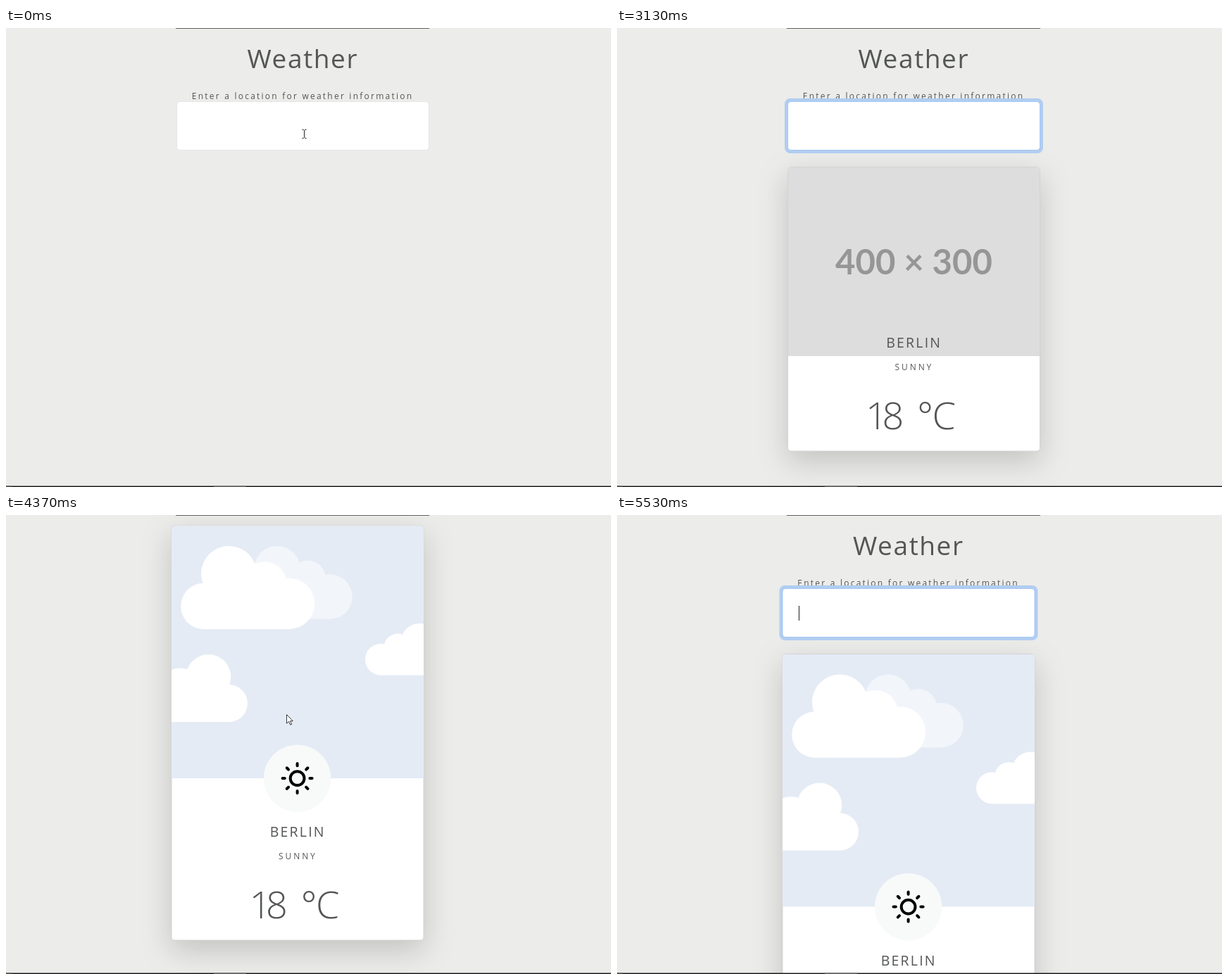
An HTML page for the animation above (5910 ms loop, 859 by 652 pixels).

```html
<!DOCTYPE html>
<html lang="en">
<head>
<meta charset="utf-8">
<title>Weather</title>
<style>
  html, body { margin: 0; width: 100%; height: 100%; overflow: hidden; background: #ececea; }
  svg { display: block; width: 859px; height: 652px; }
  text { font-family: "Open Sans", "Noto Sans", sans-serif; fill: #535655; white-space: pre; }
  .title { font-size: 37px; letter-spacing: 1.6px; }
  .label { font-size: 12px; letter-spacing: 2.23px; }
  .city { font-size: 19.5px; letter-spacing: 2.2px; }
  .sky { font-size: 12px; letter-spacing: 2.9px; }
  .degrees { font-size: 54px; font-weight: 300; }
  .size { font: bold 49px Lato, sans-serif; fill: #969696; text-anchor: middle; }
  #typed { font-size: 14px; fill: #333; }
  .card { fill: #fff; stroke: #d3d3d3; filter: drop-shadow(0 14px 21px rgba(0, 0, 0, .175)); }
</style>
</head>
<body>
<svg viewBox="0 0 859 652">
  <defs>
    <clipPath id="photo"><path d="M235 556.5V202q0-4 4-4h350q4 0 4 4v354.5z"/></clipPath>
    <path id="ray" d="M0 -17.8V-21" stroke="#000" stroke-width="4" stroke-linecap="round"/>
  </defs>

  <g id="page">
    <text class="title" x="342.5" y="56.5">Weather</text>
    <text class="label" x="263.8" y="101">Enter a location for weather information</text>

    <g id="result">
      <rect id="card" class="card" x="242.5" y="197.5" width="358" rx="4"/>
      <g id="placeholder">
        <path d="M243 466V202q0-4 4-4h349q4 0 4 4v264z" fill="#ddd"/>
        <text class="size" x="421.5" y="350">400 × 300</text>
      </g>
      <g id="picture" transform="translate(7.5 0)">
        <g clip-path="url(#photo)" fill="#fff">
          <rect x="235" y="198" width="358" height="358.5" fill="#e4ebf5"/>
          <g fill="#f2f5fa">
            <circle cx="385" cy="259.5" r="33"/><circle cx="428" cy="273" r="26"/>
            <circle cx="460" cy="298.5" r="31.7"/><rect x="380" y="270" width="80" height="60.2"/>
          </g>
          <circle cx="281" cy="312" r="32.8"/><circle cx="316.5" cy="266" r="39.5"/>
          <circle cx="367" cy="281" r="32"/><circle cx="402" cy="308.4" r="36.2"/>
          <rect x="281" y="280" width="121" height="64.7"/>

          <circle cx="532.5" cy="387.7" r="22.5"/><circle cx="556.5" cy="371" r="20"/>
          <circle cx="587" cy="362.5" r="26"/><rect x="532" y="372" width="61" height="38.2"/>

          <circle cx="247" cy="432" r="32"/><circle cx="287.5" cy="412.3" r="31.8"/>
          <circle cx="316.5" cy="450" r="26.5"/><rect x="235" y="425" width="81.5" height="51.5"/>
        </g>
        <g transform="translate(413.6 556.6)">
          <circle r="47.7" fill="#f7faf9"/>
          <circle r="9.9" fill="none" stroke="#000" stroke-width="4"/>
          <g id="rays"></g>
        </g>
      </g>
      <g id="facts">
        <text class="city" x="382.2" y="454">BERLIN</text>
        <text class="sky" x="394.6" y="486.4">SUNNY</text>
        <text class="degrees" x="353 376.5 426 447.5" y="569.5">18°C</text>
      </g>
    </g>

    <rect id="ring" x="238" y="100" width="367" height="78" rx="8" fill="#b1cdf1"/>
    <rect id="field" x="242.5" y="104.5" width="358" height="69" rx="4.5" fill="#fff"/>
    <text id="typed" x="265.5" y="146"></text>
    <rect id="caret" y="129" width="1" height="21" fill="#222"/>
  </g>

  <path id="beam" d="M-3 -6H-1L0 -5L1 -6H3M0 -5V5M-3 6H-1L0 5L1 6H3" fill="none" stroke="#222"/>
  <path id="arrow" d="M0 0V12.5L3 9.8L5.2 14.6L7.2 13.7L5 9.2H8.8Z" fill="#fff" stroke="#222" stroke-width=".9"/>

  <rect x="241" width="360" height="1" fill="#606060"/>
  <rect y="650.5" width="859" height="1.5" fill="#1c1c1c"/>
  <rect x="295" y="650.5" width="46" height="1.5" fill="#6a6a6a"/>
  <rect y="650.5" width="8" height="1.5" fill="#555"/>
</svg>

<script>
  const LOOP = 5910, CARD_AT = 3130, PICTURE_AT = 3230;
  const $ = id => document.getElementById(id);

  // Tracks hold each value until the next time.
  const text = [[0, ""], [1070, "b"], [1270, "be"], [1370, "ber"], [2070, "berl"],
                [2270, "berli"], [2450, "berlin"], [2660, ""]];
  const focus = [[0, 0], [100, .3], [200, .75], [300, 1]];
  const caretOn = [[0, 0], [300, 1], [880, 0], [1070, 1], [1880, 0], [2070, 1],
                   [2950, 0], [3520, 1], [4020, 0], [5530, 1]];
  const scroll = [[0, 0], [4120, 30], [4230, 95.3], [4330, 165], [4370, 182.5],
                  [5070, 150], [5170, 70], [5270, 0]];
  const beam = [[0, [423.5, 150.5]], [600, [416.5, 150.5]], [690, [411.5, 150.5]],
                [880, [410.5, 150.5]], [1070, null], [3620, [408.5, 150.5]], [3720, null]];
  const arrow = [[0, null], [3720, [403, 190]], [3820, [403, 245]], [3920, [402, 276]],
                 [4020, [401.5, 283.5]], [4370, [398.5, 283.5]], [4580, [397, 283]],
                 [4670, [395.5, 282.5]], [4970, [392.5, 281.5]], [5270, [380, 274]],
                 [5370, [300, 230]], [5430, [154, 178]], [5530, null]];

  const at = (track, t) => track.findLast(([start]) => t >= start)[1];
  const show = (id, on) => $(id).style.display = on ? "" : "none";
  const move = (id, x, y) => $(id).setAttribute("transform", `translate(${x} ${y})`);
  const point = (id, pos) => { show(id, pos); if (pos) move(id, ...pos); };

  for (let angle = 0; angle < 360; angle += 45)
    $("rays").innerHTML += `<use href="#ray" transform="rotate(${angle})"/>`;

  function draw(t) {
    const loaded = t >= PICTURE_AT;
    move("page", loaded ? -7.5 : 0, -at(scroll, t));

    show("result", t >= CARD_AT);
    show("placeholder", !loaded);
    show("picture", loaded);
    $("card").setAttribute("height", loaded ? 589 : 403.5);
    move("facts", 0, loaded ? 185.5 : 0);

    const glow = at(focus, t);
    $("ring").setAttribute("opacity", glow);
    $("field").setAttribute("stroke", glow > .5 ? "#a3c6f2" : "#e4e5e5");

    const typed = at(text, t);
    $("typed").textContent = typed;
    const end = 265.5 + (typed ? $("typed").getComputedTextLength() : 0);
    $("caret").setAttribute("x", Math.floor(end) + (loaded ? .5 : 0));
    show("caret", at(caretOn, t));

    point("beam", at(beam, t));
    point("arrow", at(arrow, t));
  }

  const start = performance.now();
  function tick() {
    draw((performance.now() - start) % LOOP);
    requestAnimationFrame(tick);
  }
  tick();
</script>
</body>
</html>
```
